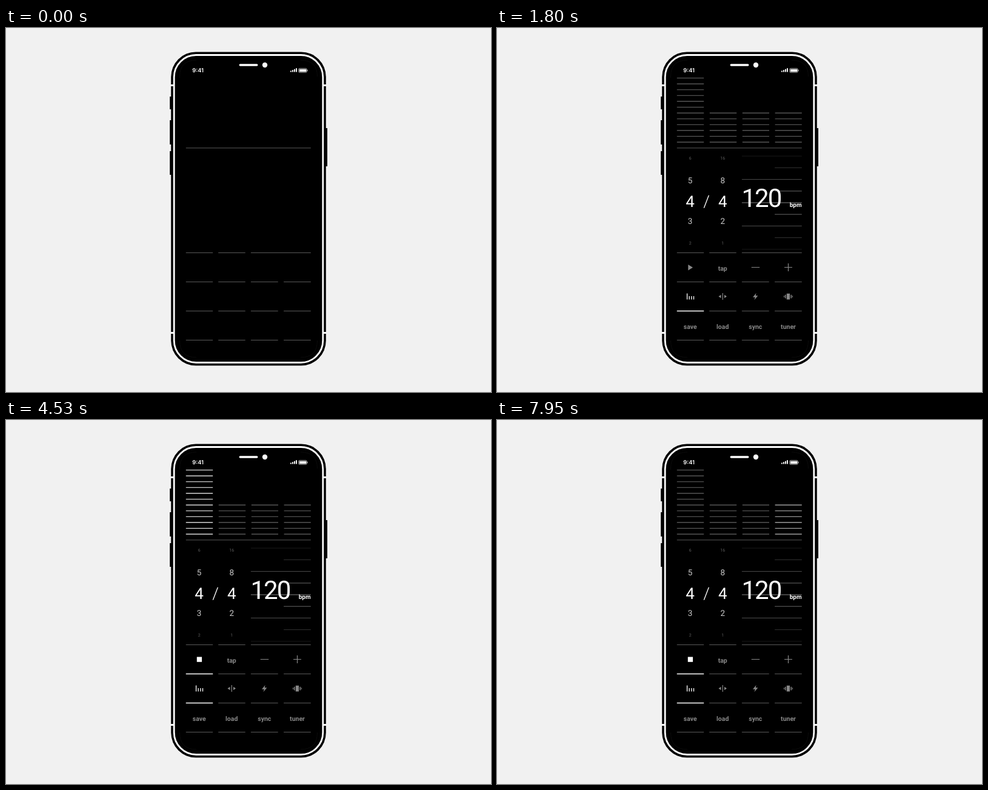
An HTML page for the animation above (8 s loop, 800 px wide and 600 px high).

```html
<!DOCTYPE html>
<html lang="en">
<head>
<meta charset="utf-8">
<title>Metronome</title>
<style>
  html, body { margin: 0; width: 100%; height: 100%; overflow: hidden; background: #f1f1f1; }
  svg { display: block; width: 800px; height: 600px; }
  text { font-family: Roboto, Inter, sans-serif; fill: #fff; text-rendering: geometricPrecision; }
  .label { font-weight: 700; font-size: 10.5px; fill: #888; text-anchor: middle; }
  .digit { text-anchor: middle; }
  .rule { stroke: #595959; fill: none; }
  .icon { fill: #888; }
  .thin { stroke: #888; stroke-width: 1.2; fill: none; }
  .lit { stroke: #fff; stroke-width: 1.3; fill: none; }
</style>
</head>
<body>
<svg viewBox="0 0 800 600">
  <defs>
    <linearGradient id="glow" x1="0" y1="0" x2="0" y2="1">
      <stop offset="0" stop-color="#555" stop-opacity=".1"/>
      <stop offset="1" stop-color="#555"/>
    </linearGradient>
    <clipPath id="dial"><rect x="290" y="199" width="220" height="172"/></clipPath>
  </defs>

  <!-- phone body -->
  <path d="M270.2 113h4v21h-4zM270.2 152h4v40h-4zM270.2 203h4v39h-4zM526 165h4v63h-4z"/>
  <rect x="272.2" y="39.5" width="255.6" height="517" rx="41"/>
  <rect x="277.2" y="44.5" width="245.6" height="507" rx="36.5" fill="none" stroke="#fff" stroke-width="2.8"/>
  <path d="M272 93h4v3h-4zM524 93h4v3h-4zM272 501h4v3h-4zM524 501h4v3h-4z" fill="#fff"/>
  <path d="M286.500 82V80Q286.500 53 314 53M486 53Q513.500 53 513.500 80M513.500 515Q513.500 543 486 543M314 543Q286.500 543 286.500 515"
        fill="none" stroke="#0c0c0c"/>

  <!-- status bar -->
  <rect x="384.500" y="59.200" width="31" height="3.600" rx="1.800" fill="#fff"/>
  <circle cx="427" cy="61" r="4.200" fill="#fff"/>
  <text x="307.300" y="72.700" style="font: 600 9.3px Inter, sans-serif">9:41</text>
  <path d="M469 70.500h1.900v2h-1.900zM472 69.200h1.900v3.300h-1.900zM475 67.800h1.900v4.700h-1.900zM478 66.300h1.900v6.200h-1.900zM484 68h11v4h-11zM496.300 68.700h1v2.500h-1z" fill="#fff"/>
  <rect x="482.800" y="66.800" width="13.200" height="6.300" rx="1.400" fill="none" stroke="#fff" stroke-width=".8"/>

  <path id="rules" class="rule"/>

  <g id="ui">
    <g id="bars" fill="none" stroke-width="1.1"></g>
    <g clip-path="url(#dial)">
      <g id="ticks" fill="#777"></g>
      <g id="wheels"></g>
    </g>
    <text x="345.500" y="295" class="digit" font-size="27" font-weight="300">/</text>
    <text id="bpm" x="403.500" y="295" font-size="42" letter-spacing="-2"></text>
    <text x="482.700" y="294.500" font-size="10" font-weight="700">bpm</text>

    <path id="play" class="icon" d="M315.300 390L323 394.700L315.300 399.400Z"/>
    <g id="stop">
      <rect id="press" x="297" y="371" width="44" height="47" fill="url(#glow)"/>
      <rect x="314.800" y="390.500" width="8.300" height="8.300" fill="#fff"/>
      <path class="lit" d="M296.800 418.500H341.200"/>
    </g>
    <path class="thin" d="M419.700 394.500H433.200M474 394.500H487M480.500 388V401"/>
    <path class="lit" d="M313.600 437.500V447.500M317.200 442V447.500M320.900 442V447.500M324.500 442V447.500M296.800 466.500H341.200"/>
    <path class="thin" d="M372.300 437V448"/>
    <path class="icon" d="M369.500 439.800V445.200L365.500 442.500ZM375 439.800V445.200L379 442.500Z"/>
    <path class="icon" d="M427.500 437L422 443.700H425.700L424.500 448.300L430.400 441.300H426.700Z"/>
    <path class="icon" d="M477.800 437.800h5.200v9.600h-5.200zM475 439.800h1.500v5.600h-1.500zM484.400 439.800h1.500v5.600h-1.500zM473 441.200h1.100v2.800h-1.100zM486.800 441.200h1.100v2.800h-1.100z"/>
    <text class="label" x="372.200" y="400.300">tap</text>
    <text class="label" x="318.800" y="496">save</text>
    <text class="label" x="372.200" y="496">load</text>
    <text class="label" x="426.300" y="496">sync</text>
    <text class="label" x="480.500" y="496">tuner</text>
  </g>
</svg>

<script>
const LOOP = 8000, INTRO = 930, INTRO_LENGTH = 900, FADE_IN = 400;
const PLAY = 2690, BEAT = 460, DECAY = 450;
const LEFT = 296.8, RIGHT = 502.8;
const TICK_GAP = 19.2, TICK_RATE = 0.768, DIAL_Y = 288;

const $ = id => document.getElementById(id);
const clamp = v => Math.max(0, Math.min(1, v));
const mix = (a, b, k) => a + (b - a) * k;

function add(parent, tag, attrs = {}, text = '') {
  const el = document.createElementNS('http://www.w3.org/2000/svg', tag);
  set(el, attrs);
  el.textContent = text;
  return parent.appendChild(el);
}
function set(el, attrs) {
  for (const key in attrs) el.setAttribute(key, attrs[key]);
}

// cubic-bezier(.52, 0, .12, 1)
function ease(x) {
  if (x <= 0 || x >= 1) return clamp(x);
  let lo = 0, hi = 1;
  for (let i = 0; i < 24; i++) {
    const s = (lo + hi) / 2, q = 1 - s;
    if (3 * q * q * s * 0.52 + 3 * q * s * s * 0.12 + s ** 3 < x) lo = s; else hi = s;
  }
  return lo * lo * (3 - 2 * lo);
}
const progress = t => ease((t - INTRO) / INTRO_LENGTH);
const tempo = t => 120 * progress(t);

// value at a fractional index of a short table
function sample(table, at) {
  const i = Math.min(Math.floor(at), table.length - 2);
  return mix(table[i], table[i + 1], clamp(at - i));
}

const COLUMNS = [[296.8, 341.2], [350.2, 394.7], [403.9, 448.7], [458.1, 502.8]];
const seg = ([a, b], y) => `M${a} ${y}H${b}`;
$('rules').setAttribute('d',
  seg([LEFT, RIGHT], 197.8) + seg(COLUMNS[0], 370.5) + seg(COLUMNS[1], 370.5) + seg([403.9, RIGHT], 370.5) +
  [418.5, 466.5, 514.5].map(y => COLUMNS.map(c => seg(c, y)).join('')).join(''));

// resting edges and how far each one is pushed right before the intro
const BARS = [
  { rest: [296.8, 341.2], push: [0, 21.9], lines: 12 },
  { rest: [350.8, 395.2], push: [21, 44.6], lines: 6 },
  { rest: [404.8, 449], push: [44, 72], lines: 6 },
  { rest: [458.6, 502.8], push: [71, 72], lines: 6 },
];
BARS.forEach(bar => bar.el = add($('bars'), 'path'));

const ticks = Array.from({ length: 12 }, () => add($('ticks'), 'rect'));

const SIZES = [26, 13.5, 7, 1], ALPHAS = [1, 0.8, 0.36, 0];
const ROWS = [
  { value: 6, y: 215, lift: 19 },
  { value: 5, y: 251, lift: 27.5 },
  { value: 4, y: 285.5, lift: 34 },
  { value: 3, y: 318.7, lift: 44.6 },
  { value: 2, y: 354.5, lift: 38 },
  { value: 1, y: 390, lift: 34 },
];
function placeDigit(el, x, y, distance) {
  const size = sample(SIZES, distance);
  set(el, { x, y: y + size * 0.355, 'font-size': size, opacity: sample(ALPHAS, distance) });
}
ROWS.forEach(row => row.el = add($('wheels'), 'text', { class: 'digit' }, row.value));
[16, 8, 4, 2, 1].forEach((value, i) => {
  placeDigit(add($('wheels'), 'text', { class: 'digit' }, value), 372.2, ROWS[i].y, Math.abs(i - 2));
});

function drawBars(t, rest) {
  const beat = Math.floor((t - PLAY) / BEAT);
  BARS.forEach((bar, i) => {
    const a = bar.rest[0] + bar.push[0] * rest;
    const b = Math.min(RIGHT, bar.rest[1] + bar.push[1] * rest);
    let d = '';
    if (a < b) for (let n = 0; n < bar.lines; n++) d += seg([a, b], (188.1 - n * 9.6).toFixed(2));

    const last = beat - (((beat - i) % 4) + 4) % 4;
    const flash = last < 0 ? 0 : clamp(1 - (t - PLAY - last * BEAT) / DECAY);
    const shade = Math.round(mix(102, 255, flash));
    set(bar.el, { d, stroke: `rgb(${shade},${shade},${shade})` });
  });
}

function drawTicks(t) {
  const shift = (tempo(t) - 120) * TICK_RATE;
  const smear = 1.1 + (tempo(t + 11) - tempo(t - 11)) * TICK_RATE;
  const first = Math.ceil((199 - DIAL_Y - shift) / TICK_GAP);
  ticks.forEach((el, i) => {
    const n = first + i, y = DIAL_Y + shift + n * TICK_GAP;
    const x = n % 2 ? 458.1 : 403.9;
    set(el, {
      x, y: y - smear / 2, width: RIGHT - x, height: smear,
      opacity: clamp(1 - Math.abs(y - DIAL_Y) / 95) * 1.1 / smear,
    });
  });
}

function draw(t) {
  const rest = 1 - progress(t);
  $('ui').setAttribute('opacity', clamp((t - INTRO) / FADE_IN));
  drawBars(t, rest);
  drawTicks(t);
  const meter = 4 - 1.31 * rest;
  ROWS.forEach(row => placeDigit(row.el, 318.6, row.y - row.lift * rest, Math.abs(row.value - meter)));
  $('bpm').textContent = Math.round(tempo(t));

  const playing = t >= PLAY - 20;
  $('play').setAttribute('visibility', playing ? 'hidden' : 'visible');
  $('stop').setAttribute('visibility', playing ? 'visible' : 'hidden');
  $('press').setAttribute('opacity', clamp(1 - (t - PLAY) / 780));
}

const start = performance.now();
function frame() {
  draw((performance.now() - start) % LOOP);
  requestAnimationFrame(frame);
}
frame();
</script>
</body>
</html>
```
